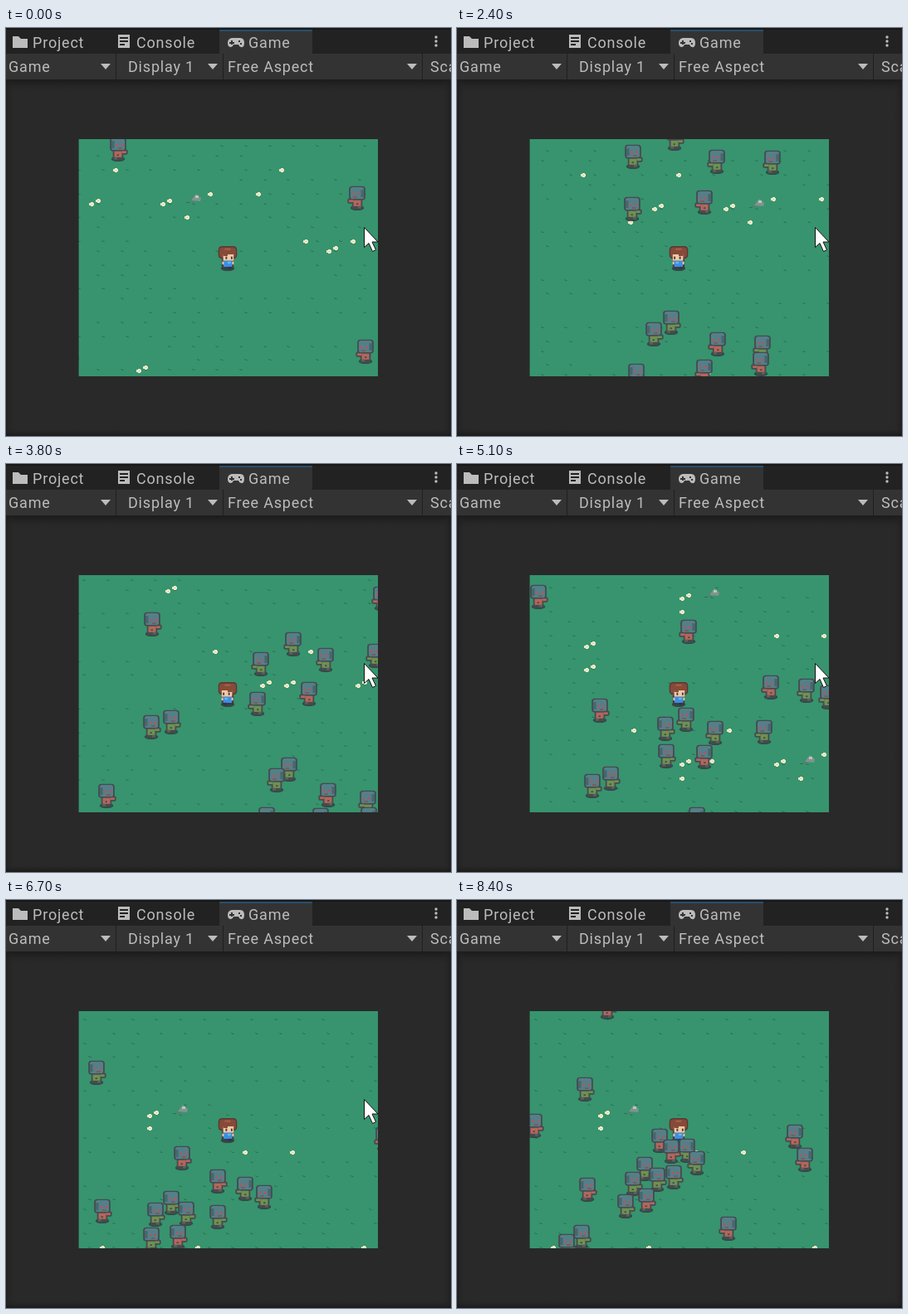
An HTML page with a canvas for the animation above (8500 ms loop, 536 by 492 pixels).

```html
<!DOCTYPE html>
<html lang="en">
<head>
<meta charset="utf-8">
<title>Game view</title>
<style>
  html, body { margin: 0; width: 100%; height: 100%; overflow: hidden; background: #292929; }
  svg, canvas { position: absolute; display: block; }
  svg { left: 0; top: 0; }
  canvas { left: 87px; top: 134px; }
  text { font: 18px Roboto, sans-serif; letter-spacing: .8px; fill: #bcbcbc; }
</style>
</head>
<body>
<svg width="536" height="492" viewBox="0 0 536 492">
  <defs>
    <linearGradient id="down" x2="0" y2="1">
      <stop stop-color="#161616" stop-opacity=".8"/>
      <stop offset="1" stop-color="#292929" stop-opacity="0"/>
    </linearGradient>
    <linearGradient id="side">
      <stop stop-color="#1c1c1c" stop-opacity=".7"/>
      <stop offset="1" stop-color="#292929" stop-opacity="0"/>
    </linearGradient>
  </defs>
  <rect width="536" height="492" fill="#292929"/>
  <rect y="62" width="536" height="17" fill="url(#down)"/>
  <rect y="63" width="11" height="429" fill="url(#side)"/>
  <rect y="63" width="11" height="429" fill="url(#side)" transform="matrix(-1 0 0 1 536 0)"/>
  <rect width="536" height="10" fill="url(#down)" transform="matrix(1 0 0 -1 0 492)"/>
  <rect width="536" height="31" fill="#222"/>
  <rect width="536" height="2" fill="#171717"/>
  <rect y="31" width="536" height="31" fill="#333"/>
  <rect y="62" width="536" height="1" fill="#1d1d1d"/>
  <rect x="257" y="2" width="112" height="30" fill="#333"/>
  <rect x="257" y="2" width="112" height="2" fill="#274f70"/>
  <path d="M132.500 31v31M261.500 31v31M501.500 31v31" stroke="#1f1f1f"/>
  <g fill="#bcbcbc">
    <path d="M8 10h7l3 3h8v11H8z"/>
    <path fill-rule="evenodd" d="M135 8h14v16h-14zM137 11v2h10v-2zM137 15v2h10v-2zM137 19v2h6v-2z"/>
    <path fill-rule="evenodd" d="M272 12h10q5 0 5 6t-4 5q-2 0-3-3h-6q-1 3-3 3-4 0-4-5t5-6zM271 15v2h-2v2h2v1h2v-1h2v-2h-2v-2zM280 15v2h2v-2zM282 18v2h2v-2z"/>
    <circle cx="518" cy="11" r="1.700"/><circle cx="518" cy="16" r="1.700"/><circle cx="518" cy="21" r="1.700"/>
    <path d="M114 43h12l-6 7zM243 43h12l-6 7zM483 43h12l-6 7z"/>
  </g>
  <text x="32" y="24">Project</text>
  <text x="157" y="24">Console</text>
  <text x="292" y="24">Game</text>
  <text x="3" y="53">Game</text>
  <text x="147" y="53">Display 1</text>
  <text x="267" y="53">Free Aspect</text>
  <text x="511" y="53">Scale</text>
</svg>
<canvas id="view" width="361" height="286"></canvas>
<svg id="cursor" width="536" height="492" viewBox="0 0 536 492">
  <path d="M431.500 240.500v24l5.500-5 4.500 10 4-2-4.500-9.500h7z" fill="#fff" stroke="#111"/>
</svg>
<script>
const ctx = document.getElementById('view').getContext('2d');
const cursor = document.getElementById('cursor');
const LOOP = 8500, STEP = 100, FRAMES = LOOP / STEP, CURSOR_GONE = 7600;
const TILE = 28.65, PX = TILE / 16, HERO_SPEED = 3, ZOMBIE_SPEED = 1;
const VIEW = { x: 87, y: 134, w: 361, h: 286 };
const HERO = { x: 267, y: 278 };
const ORIGIN = { x: 17, y: 171 };

// The hero's walk: start, end and compass heading
const walk = [
  { from: 800, to: 900, dx: -1, dy: -1 },
  { from: 900, to: 3000, dx: -1, dy: 0 },
  { from: 3000, to: 3800, dx: -1, dy: -1 },
  { from: 3800, to: 4460, dx: 0, dy: -1 },
  { from: 4460, to: 6700, dx: 1, dy: -1 }
];

// Zombies surround the hero in waves, each one `gap` further out than the last.
const waves = [
  { at: 0, near: 172, gap: 14, bearings: [335, 225, 34], shirts: 'rrr' },
  { at: 1600, near: 126, gap: 5, bearings: [98, 132, 71, 262, 293, 74, 135, 207], shirts: 'rggggrgg' },
  { at: 2400, near: 135, gap: 5, bearings: [246, 77, 268, 110], shirts: 'grgg' },
  { at: 3800, near: 76, gap: 24, bearings: [154, 157, 223], shirts: 'ggr' },
  { at: 3800, near: 190, gap: 28, bearings: [140, 328], shirts: 'rr' },
  { at: 5100, near: 77, gap: 0, bearings: [279], shirts: 'r' },
  { at: 5100, near: 154, gap: 26, bearings: [358, 1, 215], shirts: 'ggr' },
  { at: 8400, near: 124, gap: 16, bearings: [204, 3, 13, 240], shirts: 'grrr' }
];

// Decorations on the tile grid: row, then columns
const blooms = { '-5': [2], '-4': [6, 8], 0: [0, 4, 11], 1: [8, 10], 2: [2, 7], 3: [12, 14] };
const pairs = { '-5.55': [2], '-3.55': [-2], '-2.55': [-2], 1.43: [2, 3, 6], 3.43: [13], 8.43: [5] };
const rocks = { '-5.8': [3.35], 1.2: [7.35] };

function scrollAt(t) {
  let x = 0, y = 0;
  for (const { from, to, dx, dy } of walk) {
    const time = Math.max(0, Math.min(t, to) - from) / 1000;
    const dist = time * HERO_SPEED * TILE / Math.hypot(dx, dy);
    x -= dx * dist;
    y -= dy * dist;
  }
  return { x, y };
}

function heroAt(i) {
  const s = scrollAt(i * STEP);
  return { x: HERO.x - s.x, y: HERO.y - s.y };
}

// One step straight at the hero, or away from him to look back in time
function chase(p, i, dir) {
  const h = heroAt(i), dx = h.x - p.x, dy = h.y - p.y, d = Math.hypot(dx, dy);
  const stride = ZOMBIE_SPEED * TILE * STEP / 1000;
  const k = (dir > 0 ? Math.min(stride, Math.max(0, d - 26)) : -stride) / d;
  return { x: p.x + dx * k, y: p.y + dy * k };
}

function separate(a, b) {
  const dx = b.x - a.x, dy = b.y - a.y, d = Math.hypot(dx, dy), gap = 20;
  if (d >= gap || !d) return;
  const k = (gap - d) / d / 2;
  a.x -= dx * k; a.y -= dy * k;
  b.x += dx * k; b.y += dy * k;
}

const zombies = waves.flatMap(({ at, near, gap, bearings, shirts }) => bearings.map((deg, n) => {
  const seen = at / STEP, born = Math.max(0, seen - 22), path = [];
  const h = heroAt(seen), angle = deg * Math.PI / 180, dist = near + n * gap;
  path[seen] = { x: h.x + dist * Math.cos(angle), y: h.y + dist * Math.sin(angle) };
  for (let i = seen; i > born; i--) path[i - 1] = chase(path[i], i - 1, -1);
  return { seen, born, path, red: shirts[n] === 'r' };
}));

for (let i = 1; i < FRAMES; i++) {
  const active = zombies.filter(z => z.seen < i);
  for (const z of active) z.path[i] = chase(z.path[i - 1], i, 1);
  active.forEach((a, n) => active.slice(n + 1).forEach(b => separate(a.path[i], b.path[i])));
}

function box(color, x, y, w, h) {
  ctx.fillStyle = color;
  ctx.fillRect(x, y, w, h);
}

function round(color, x, y, w, h, r) {
  ctx.fillStyle = color;
  ctx.beginPath();
  ctx.roundRect(x, y, w, h, r);
  ctx.fill();
}

function at(x, y, flip, draw) {
  ctx.save();
  ctx.translate(Math.round(x), Math.round(y));
  ctx.scale(flip ? -PX : PX, PX);
  draw();
  ctx.restore();
}

function shadow() {
  ctx.fillStyle = 'rgba(48,56,58,.8)';
  ctx.beginPath();
  ctx.ellipse(0, 6.7, 4.6, 1.7, 0, 0, 7);
  ctx.fill();
}

function drawZombie(red, foot) {
  const line = '#454b50', skin = '#557f88', spot = '#b8545a';
  const shirt = red ? '#b5665a' : '#6f9150';
  shadow();
  round(line, -3.5, 0, 7, 7.5, 1);
  round(line, 1, .3, 5.5, 3.5, 1);
  round(line, -5.5, -8, 11, 9.5, 2);
  round(skin, -4.5, -7.2, 9, 7.8, 1.5);
  box('#46676f', -4.5, -5.5, 2, 5);
  box(spot, -1.4, -3.4, 1.4, 1.4);
  box(spot, 2, -3.4, 1.4, 1.4);
  box('#80565a', 0, -1, 2.6, 1);
  box(shirt, -2.5, 1.5, 5, 4);
  box(shirt, 2.5, 1.3, 3, 1.5);
  box(line, -.8, 3.5, 1.3, 1);
  box('#5a625d', foot ? -2.6 : .6, 5.5, 2, 1.5);
}

function drawHero(foot) {
  const hair = '#854a38', line = '#5b3634', skin = '#f1c9a4';
  shadow();
  round('#3d3b48', -4, 0, 8, 7, 1);
  round(line, -6.3, -8.4, 12.6, 8.6, 2.5);
  round(hair, -5.6, -7.6, 11.2, 7, 2);
  box('#a8634a', -2, -6.8, 4, 1);
  box(skin, -3, -2.8, 7, 4.3);
  box(hair, -3, -3, 3, 1.3);
  box('#44313a', -1.4, -1.3, 1, 1.7);
  box('#44313a', 2.2, -1.3, 1, 1.7);
  box('#3b8fe4', -2.8, 1.6, 5.8, 4);
  box('#68b8f3', 0, 2.2, 2, 1.2);
  box(skin, -3.7, 2, 1.1, 2);
  box(skin, 3, 2, 1.1, 2);
  box('#353641', foot ? -2.8 : .5, 5.5, 2.2, 1.7);
}

function drawFlower(x, y) {
  box('#e9e4c0', x - 3, y - 1, 6, 3);
  box('#f3ebcb', x - 1, y - 2, 3, 5);
  box('#d9bd80', x, y, 1, 1);
}

function drawRock(x, y) {
  box('#2a6f54', x - 11, y + 5, 4, 1);
  box('#5f7a74', x - 7, y + 3, 5, 2);
  ctx.fillStyle = '#82938f';
  ctx.beginPath();
  ctx.moveTo(x - 5, y + 3);
  ctx.lineTo(x + 1, y - 5);
  ctx.lineTo(x + 7, y);
  ctx.lineTo(x + 6, y + 4);
  ctx.fill();
  box('#b7c4c0', x, y - 3, 4, 3);
}

function drawBlade(x, y) {
  box('#2d7f5f', x - 2, y, 2, 1);
  box('#28795a', x - 1, y + 1, 3, 1);
}

function drawGrass(s) {
  box('#37946e', VIEW.x, VIEW.y, VIEW.w, VIEW.h);
  const c0 = Math.floor((VIEW.x - s.x - ORIGIN.x) / TILE) - 1;
  const r0 = Math.floor((VIEW.y - s.y - ORIGIN.y) / TILE) - 1;
  for (let r = r0; r < r0 + 13; r++) for (let c = c0; c < c0 + 16; c++) {
    const x = Math.round(ORIGIN.x + c * TILE + s.x), y = Math.round(ORIGIN.y + r * TILE + s.y);
    const seed = Math.sin(c * 12.9 + r * 78.2);
    if (seed > -.4) drawBlade(x + 14, y - 1);
    if (seed < .4) drawBlade(x + 8, y + 11);
  }
}

function place(rows, s, draw) {
  for (const [row, cols] of Object.entries(rows)) for (const col of cols)
    draw(Math.round(ORIGIN.x + col * TILE + s.x), Math.round(ORIGIN.y + row * TILE + s.y));
}

function render(i) {
  const s = scrollAt(i * STEP), before = scrollAt((i - 1) * STEP);
  const moving = s.x !== before.x || s.y !== before.y;
  ctx.setTransform(1, 0, 0, 1, -VIEW.x, -VIEW.y);
  drawGrass(s);
  place(blooms, s, drawFlower);
  place(pairs, s, (x, y) => { drawFlower(x, y); drawFlower(x + 8, y - 4); });
  place(rocks, s, drawRock);

  const actors = zombies.filter(z => i >= z.born).map((z, n) => {
    const x = z.path[i].x + s.x, y = z.path[i].y + s.y;
    return { x, y, flip: x > HERO.x, draw: () => drawZombie(z.red, (i + n) % 4 < 2) };
  });
  actors.push({ ...HERO, flip: s.x > before.x, draw: () => drawHero(moving && i % 4 < 2) });
  actors.sort((a, b) => a.y - b.y).forEach(a => at(a.x, a.y, a.flip, a.draw));
  box('rgba(41,41,41,.6)', VIEW.x, VIEW.y, 1, VIEW.h);
  cursor.style.display = i * STEP < CURSOR_GONE ? 'block' : 'none';
}

function tick() {
  render(Math.floor(performance.now() % LOOP / STEP));
  requestAnimationFrame(tick);
}
tick();
</script>
</body>
</html>
```
